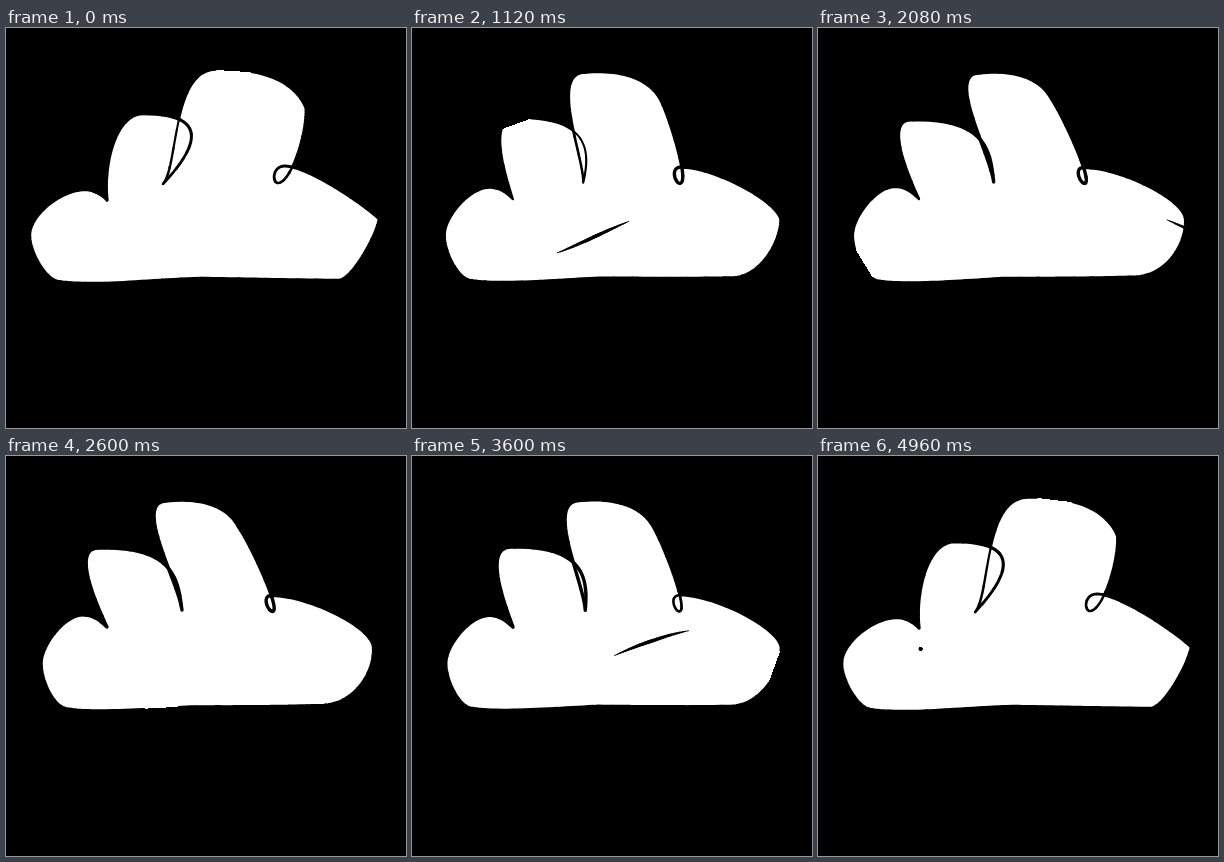
Write an HTML page that moves like this. It is 400x400 px and loops after 5 s.

```html
<!DOCTYPE html>
<html>
<head>
<meta charset="utf-8">
<style>
  html, body { margin: 0; width: 100%; height: 100%; overflow: hidden; background: #000; }
  svg { display: block; width: 100vw; height: 100vh; }
</style>
</head>
<body>
<svg viewBox="0 0 400 400">
  <rect width="400" height="400"/>
  <path id="body" fill="#fff" shape-rendering="crispEdges"/>
  <g id="edge" fill="none" stroke="#000" stroke-linecap="round" stroke-linejoin="round"></g>
  <g id="line" fill="none" stroke="#000" stroke-linecap="round" stroke-linejoin="round"></g>
</svg>
<script>
const LOOP = 5000, HALF = LOOP / 2, GAP = 0.03;

// Cubic curves: one start point, then three points per segment.
const nums = s => s.trim().split(/[\s,]+/).map(Number);
const wide = nums(`210 42
  240 41 285 46 299.5 80   301 105 285 155 272 155   266 155 266 138 279 138
  300 138 353 172 373.5 191   369 212 345 252 333 252.5   280 252 240 251 195 250.5
  140 252 90 259 52 253.5   40 252 23.5 225 23.5 207   23.5 187 55 161.5 79 161.5
  90 161.5 100 170 101 172   97 140 108 86 137 85.5   195 86 200 110 157 156
  172 140 166 42 210 42`);
const swept = nums(`160 45
  195 41 222 50 232.5 71   243 85 276 155 266.5 155.5   262 155.5 255 139 266 139.5
  300 139 366 170 367.5 191   369 215 350 247 318 249   270 250.5 230 250 185 250
  150 252 85 257 60 252   48 250 35.5 225 35.5 207   35.5 190 58 159 77 159
  90 159 97 168 101 171   96 160 62 91 93 92   170 90 172 126 176 154
  172 125 127 46 160 45`);
const inner = nums(`103 193
  72 181 50 191 52 207   55 222 82 236 108 234   145 231 185 205 228 189
  255 180 287 167 313 177   365 197 420 225 560 290`);

const bez = (a, b, c, d, u) => {
  const v = 1 - u;
  return v * v * v * a + 3 * v * v * u * b + 3 * v * u * u * c + u * u * u * d;
};

// Flattens curves to points with their running length.
function flatten(c, steps = 24) {
  const pts = [[c[0], c[1]]], len = [0];
  for (let i = 0; i + 7 < c.length; i += 6) {
    for (let k = 1; k <= steps; k++) {
      const u = k / steps;
      const p = [bez(c[i], c[i + 2], c[i + 4], c[i + 6], u),
                 bez(c[i + 1], c[i + 3], c[i + 5], c[i + 7], u)];
      const q = pts[pts.length - 1];
      len.push(len[len.length - 1] + Math.hypot(p[0] - q[0], p[1] - q[1]));
      pts.push(p);
    }
  }
  return { pts, len, total: len[len.length - 1] };
}

function pointAt(line, s) {
  const { pts, len } = line;
  let lo = 0, hi = len.length - 1;
  while (hi - lo > 1) {
    const mid = (lo + hi) >> 1;
    if (len[mid] <= s) lo = mid; else hi = mid;
  }
  const k = (s - len[lo]) / (len[hi] - len[lo]);
  return [pts[lo][0] + (pts[hi][0] - pts[lo][0]) * k,
          pts[lo][1] + (pts[hi][1] - pts[lo][1]) * k];
}

// Points between two lengths, wrapping past the end of a closed line.
function slice(line, from, to) {
  const out = [], { total } = line;
  const wrap = s => ((s % total) + total) % total;
  out.push(pointAt(line, wrap(from)));
  for (let turn = Math.floor(from / total); turn * total < to; turn++) {
    line.len.forEach((l, i) => {
      const s = l + turn * total;
      if (s > from && s < to) out.push(line.pts[i]);
    });
  }
  out.push(pointAt(line, wrap(to)));
  return out;
}

const toPath = pts => 'M' + pts.map(p => p[0].toFixed(2) + ' ' + p[1].toFixed(2)).join('L');

function brush(id, count) {
  const parts = Array.from({ length: count }, () => {
    const el = document.createElementNS('http://www.w3.org/2000/svg', 'path');
    return document.getElementById(id).appendChild(el);
  });
  return (line, from, to, width) => {
    const step = (to - from) / count;
    parts.forEach((el, i) => {
      const a = from + i * step;
      el.setAttribute('d', to > from ? toPath(slice(line, a, a + step)) : '');
      el.setAttribute('stroke-width', width((i + 0.5) / count).toFixed(2));
    });
  };
}

// Cubic ease with control points (.25,.1) and (.25,1).
function ease(x) {
  let lo = 0, hi = 1;
  for (let i = 0; i < 24; i++) {
    const mid = (lo + hi) / 2;
    if (bez(0, 0.25, 0.25, 1, mid) < x) lo = mid; else hi = mid;
  }
  return bez(0, 0.1, 1, 1, lo);
}

const body = document.getElementById('body');
const drawEdge = brush('edge', 60);
const drawLine = brush('line', 26);
const innerLine = flatten(inner);

function render(ms) {
  const t = ms % LOOP;
  const there = t < HALF ? t : LOOP - t;

  const e = ease(there / HALF);
  const cloud = flatten(wide.map((v, i) => v + (swept[i] - v) * e));
  const size = cloud.total;
  const from = (GAP - t / LOOP) * size;
  const to = from + (1 - GAP) * size;
  body.setAttribute('d', toPath(slice(cloud, from, to)) + 'Z');
  drawEdge(cloud, from, to, u =>
    Math.min(3.4, 1.5 + 0.008 * Math.min(u, 1 - u) * (to - from)));

  const head = Math.max(0, 0.226 * (there - 35));
  drawLine(innerLine, Math.max(0, head - 78), head, u => 0.8 + 2.7 * Math.sin(Math.PI * u));
}

const start = performance.now();
function tick() {
  render(performance.now() - start);
  requestAnimationFrame(tick);
}
tick();
</script>
</body>
</html>
```
